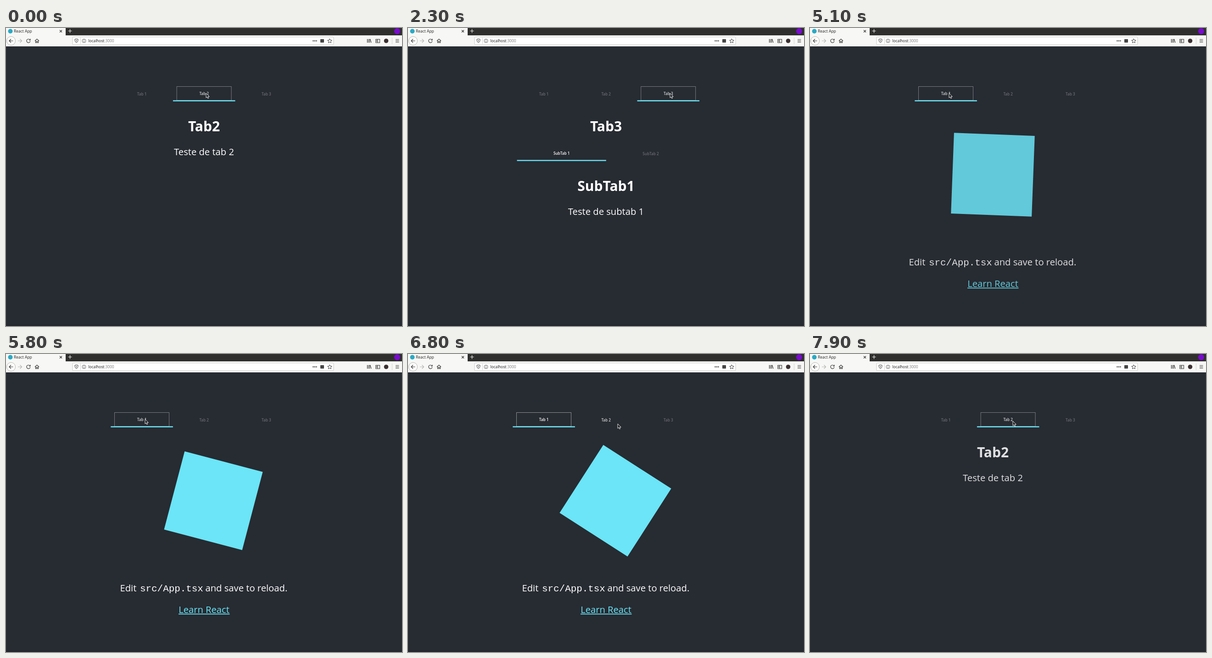
An HTML page for the animation above (8 s loop, 863x649 px).

```html
<!DOCTYPE html>
<html lang="en">
<head>
<meta charset="utf-8">
<title>Tabs</title>
<style>
  html, body { margin: 0; width: 100%; height: 100%; overflow: hidden; background: #272b32; }
  svg { display: block; font-family: "Open Sans", "Noto Sans", sans-serif; fill: #fff; }
  .icon { fill: none; stroke: #3a3a3a; stroke-width: 1.2; }
  .mid { text-anchor: middle; }
  .tab { font-size: 8.2px; font-weight: 600; }
  .title { font-size: 30px; font-weight: 700; }
  .body { font-size: 20.2px; }
  .code { font: 20.9px "Liberation Mono", monospace; }
  .cyan { fill: #6be5f7; }
</style>
</head>
<body>
<svg id="stage" width="863" height="649" viewBox="0 0 863 649">
  <rect y="646" width="863" height="3" fill="#23272d"/>

  <!-- browser window -->
  <rect width="863" height="16" fill="#2f2f2d"/>
  <rect width="130" height="17" fill="#f7f8f5"/>
  <rect y="16" width="863" height="24" fill="#f7f8f5"/>
  <circle cx="9.5" cy="7" r="5" fill="#2aa9c4"/>
  <text x="17" y="10" font-size="8.5" fill="#222">React App</text>
  <path class="icon" d="M117 4.5l5 5m0-5l-5 5"/>
  <path class="icon" style="stroke:#eee" d="M135.500 6.500h8m-4-4v8"/>
  <circle cx="852.500" cy="7" r="6.500" fill="#7a0bd0"/>
  <circle cx="11" cy="28" r="9.500" fill="#fcfcfb" stroke="#b4b4b2"/>
  <path class="icon" d="M15.500 28h-8.500m4-4l-4 4 4 4"/>
  <path class="icon" style="stroke:#b5b5b3" d="M26 28h8.500m-4-4l4 4-4 4"/>
  <path class="icon" d="M52 25.500a4 4 0 1 0 .8 3.200M53 23.500v3h-3"/>
  <path class="icon" d="M63 28l4.500-4 4.500 4M64.500 27.500v4.500h2v-3h2v3h2v-4.500"/>
  <rect x="145" y="19.500" width="569" height="17" rx="2" stroke="#cbcbc9"/>
  <path class="icon" style="stroke-width:1" d="M150 24.500l3.500-1 3.500 1c0 4-1 6-3.500 7.500-2.500-1.500-3.500-3.500-3.500-7.500zm3.500 1v4"/>
  <path class="icon" style="stroke:#d5d5d3;stroke-width:1" d="M162.500 21v14M841.500 21v14"/>
  <circle class="icon" style="stroke:#666;stroke-width:1" cx="170" cy="28" r="4"/>
  <path class="icon" style="stroke:#666" d="M170 25.300v1.200m0 1v3"/>
  <text x="179.500" y="31" font-size="8.300" fill="#111">localhost<tspan fill="#777">:3000</tspan></text>
  <g fill="#444">
    <circle cx="669.500" cy="28" r="1.300"/><circle cx="673" cy="28" r="1.300"/><circle cx="676.500" cy="28" r="1.300"/>
    <rect x="685" y="24.300" width="8" height="7.500" rx="1"/>
  </g>
  <path class="icon" style="stroke-width:1" d="M705.500 23.300l1.400 3.100 3.300.4-2.500 2.300.7 3.300-2.900-1.700-2.900 1.700.7-3.300-2.500-2.300 3.300-.4z"/>
  <path class="icon" d="M787.500 24v8m2.500-8v8m2.500-8v8m1-8l2.500 8"/>
  <path class="icon" d="M806 24.500h8.500v7.500h-8.500zm4 0v7.500m-3-5h2m-2 2h2"/>
  <circle cx="828.500" cy="28" r="4.800" fill="#3b3031"/>
  <path class="icon" d="M849 25h7.500m-7.500 3h7.500m-7.500 3h7.500"/>

  <g id="tabs"></g>

  <g id="view1">
    <rect id="logo" class="cyan" x="-88" y="-88" width="176" height="176"/>
    <g class="slide">
      <text class="body" x="248.500" y="516.500">Edit</text>
      <text class="code" x="292" y="516.500">src/App.tsx</text>
      <text class="body" x="434.500" y="516.500">and save to reload.</text>
      <text class="body mid cyan" x="431.500" y="563.500">Learn React</text>
      <rect class="cyan" x="376" y="565.500" width="111.500" height="1.700"/>
    </g>
  </g>
  <g id="view2" class="slide">
    <text class="title mid" x="431.500" y="225">Tab2</text>
    <text class="body mid" x="431.500" y="277">Teste de tab 2</text>
  </g>
  <g id="view3" class="slide">
    <text class="title mid" x="431.500" y="225">Tab3</text>
    <g id="subtabs"></g>
    <g class="slide">
      <text class="title mid" x="431.500" y="355">SubTab1</text>
      <text class="body mid" x="431.500" y="406.500">Teste de subtab 1</text>
    </g>
  </g>

  <path id="arrow" d="M0 0V10L2.300 8 3.900 11.400 5.600 10.700 4.100 7.400H7.200Z" fill="#1c1e22" stroke="#fff" stroke-width=".9"/>
  <path id="beam" d="M-2-5H2M0-5V5M-2 5H2" fill="none" stroke="#ddd"/>
</svg>
<script>
const $ = id => document.getElementById(id);
const LOOP = 8000, STEP = 100;

// [start, tab, offsets of the first steps of the slide-in]
const views = [[0, 2, []], [2100, 3, [-175, -33]], [5000, 1, [-200, -33]], [7800, 2, [-170, -33]]];
const focusChanges = [[0, 2], [1900, 3], [4800, 1], [7600, 2]];
// [time, x, y]
const pointer = [
  [0, 436, 142], [1200, 436, 142], [1800, 571, 142], [2900, 571, 142], [3000, 545, 225],
  [3100, 494, 358], [3400, 494, 358], [3500, 495, 358], [3600, 495, 358], [3800, 504, 355],
  [4100, 372, 242], [4300, 322, 196], [4500, 306, 161], [4700, 303, 142], [6200, 303, 142],
  [6800, 457, 152], [7200, 442, 146], [LOOP, 442, 146]
];

const latest = (list, t) => list.findLast(entry => entry[0] <= t);
const show = (el, on) => el.setAttribute('visibility', on ? 'inherit' : 'hidden');

function add(parent, name, attrs, text = '') {
  const el = document.createElementNS('http://www.w3.org/2000/svg', name);
  for (const key in attrs) el.setAttribute(key, attrs[key]);
  el.textContent = text;
  return parent.appendChild(el);
}

function makeTabs(parent, labels, left, top, width) {
  return labels.map((label, i) => {
    const x = left + i * width;
    const group = add(parent, 'g', {});
    return {
      x, top, width, group,
      text: add(group, 'text', { class: 'tab mid', x: x + width / 2 }, label),
      box: add(group, 'rect', { x: x + 8.2, y: top + .5, width: width - 16.6, fill: 'none', stroke: '#8f9396' }),
      line: add(parent, 'rect', { class: 'cyan', x, y: top + 30.3, width, height: 2.4 })
    };
  });
}

function updateTabs(tabs, active, focused, [x, y]) {
  tabs.forEach((tab, i) => {
    const on = i + 1 === active;
    const hover = x >= tab.x && x < tab.x + tab.width && y >= tab.top && y < tab.top + 33;
    tab.group.setAttribute('opacity', hover ? .8 : on ? 1 : .3);
    tab.text.setAttribute('y', tab.top + (on ? 19 : 20));
    tab.box.setAttribute('height', on ? 30 : 32);
    show(tab.box, i + 1 === focused);
    show(tab.line, on);
  });
}

function pointerAt(t) {
  const i = pointer.findIndex(p => p[0] > t);
  const [t0, x0, y0] = pointer[i - 1], [t1, x1, y1] = pointer[i];
  const k = (t - t0) / (t1 - t0);
  return [x0 + (x1 - x0) * k, y0 + (y1 - y0) * k];
}

const tabs = makeTabs($('tabs'), ['Tab 1', 'Tab 2', 'Tab 3'], 228.3, 127, 135.6);
const subtabs = makeTabs($('subtabs'), ['SubTab 1', 'SubTab 2'], 237.5, 257, 194.3);
const slides = document.querySelectorAll('.slide');

function draw(t) {
  const [start, active, offsets] = latest(views, t);
  const offset = offsets[(t - start) / STEP] || 0;
  const opacity = 1 + offset / 225;
  const at = pointerAt(t);

  updateTabs(tabs, active, latest(focusChanges, t)[1], at);
  updateTabs(subtabs, 1, 0, at);
  for (const n of [1, 2, 3]) show($('view' + n), n === active);
  for (const el of slides) {
    el.setAttribute('transform', `translate(${offset})`);
    el.setAttribute('opacity', opacity);
  }

  const logoX = offset ? 431.5 + offset : 452;
  $('logo').setAttribute('transform', `translate(${logoX} 319.5) rotate(${(t - 4980) * .018})`);
  $('logo').setAttribute('opacity', opacity);

  const overText = t >= 3100 && t < 3700;
  show($('beam'), overText);
  show($('arrow'), !overText);
  for (const id of ['beam', 'arrow']) $(id).setAttribute('transform', `translate(${at})`);
}

const begin = performance.now();
function tick() {
  const t = (performance.now() - begin) % LOOP;
  draw(Math.floor(t / STEP) * STEP);
  requestAnimationFrame(tick);
}
tick();
</script>
</body>
</html>
```
